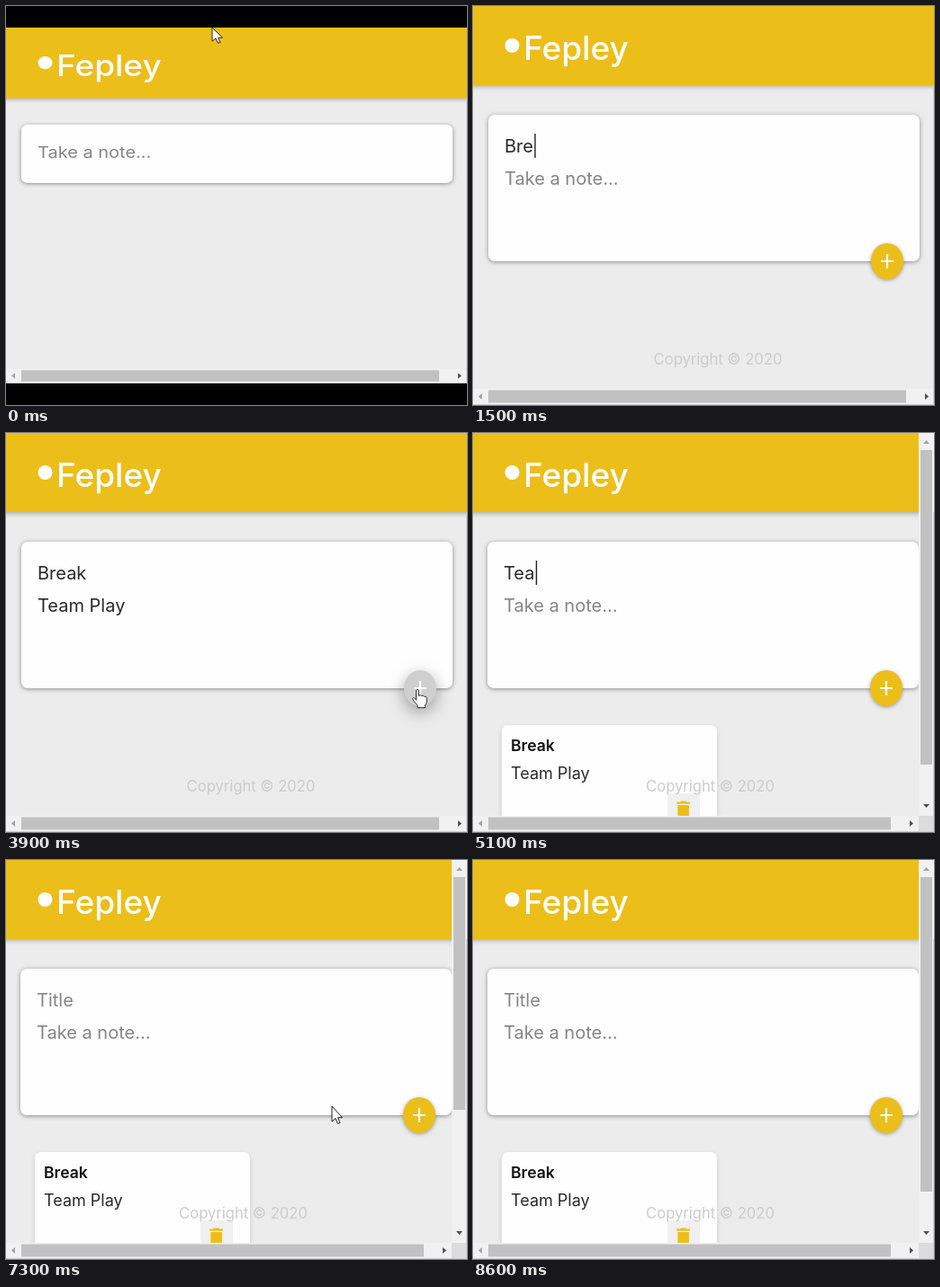
Write an HTML page that moves like this. It is 512 by 444 pixels and loops after 8.7 s.

```html
<!DOCTYPE html>
<html lang="en">
<head>
<meta charset="utf-8">
<title>Notes</title>
<style>
  html, body { margin: 0; width: 100%; height: 100%; overflow: hidden; background: #000; }
  svg { display: block; width: 512px; height: 444px; font-family: Inter, "Open Sans", sans-serif; }
  .bar { fill: #ecbe19; filter: drop-shadow(0 2px 2.5px rgba(0,0,0,.26)); }
  .card { fill: #fefefe; filter: drop-shadow(0 1px 2.5px #8a8989); }
  .paper { fill: #fefefe; filter: drop-shadow(0 2px 2.5px rgba(0,0,0,.14)); }
  .brand { fill: #fff; font-size: 37px; font-weight: 500; }
  .field { font-size: 20px; }
  .note { font-size: 18px; fill: #2a2a2a; }
  .head { font-size: 17.6px; font-weight: 600; fill: #111; }
  .foot { font-size: 16.6px; fill: #ccc; text-anchor: middle; }
  .field, .note { white-space: pre; }
</style>
</head>
<body>
<svg viewBox="0 0 512 444">
  <defs>
    <g id="note">
      <rect class="paper" x="32" y="325" width="239" height="126" rx="7"/>
      <rect x="216" y="401" width="36" height="40" fill="#f0f0f0"/>
      <path transform="translate(221 406) scale(1.05 1.13)" fill="#ecbe19"
        d="M6 19c0 1.1.9 2 2 2h8c1.1 0 2-.9 2-2V7H6zM19 4h-3.5l-1-1h-5l-1 1H5v2h14z"/>
    </g>
    <clipPath id="frame"><rect width="512" height="444"/></clipPath>
  </defs>
  <g id="app" clip-path="url(#frame)">
    <rect width="512" height="444" fill="#ececec"/>
    <g id="page">
      <rect class="bar" x="-10" y="-10" width="532" height="98"/>
      <circle cx="43.5" cy="44" r="8" fill="#fff"/>
      <text class="brand" x="56" y="60">Fepley</text>
      <g id="form">
        <rect id="card" class="card" x="17" y="121" width="479" rx="7"/>
        <text id="title" class="field" x="35" y="163"></text>
        <text id="body" class="field" x="35"></text>
        <path id="caret" stroke="#222" stroke-width="1.4"/>
        <g id="plus">
          <ellipse id="disc" rx="18" ry="20"/>
          <path d="M-7 0H7M0-8V8" stroke="#fff" stroke-width="2.2"/>
        </g>
      </g>
      <g id="first">
        <use href="#note"/>
        <text class="note head" x="42" y="354">Break</text>
        <text class="note" x="42" y="385">Team Play</text>
      </g>
      <g id="second" transform="translate(0 163)">
        <use href="#note"/>
        <text class="note head" x="42" y="354">Tea</text>
        <text class="note" x="42" y="385">Green tea</text>
      </g>
      <text id="foot" class="foot" y="399">Copyright © 2020</text>
    </g>
    <g id="across">
      <rect y="426" width="512" height="18" fill="#f1f1f1"/>
      <rect id="thumbX" x="17" y="427.5" height="14" fill="#c1c1c1"/>
      <path d="M10 431v7l-4-3.5z" fill="#a3a3a3"/>
      <path id="right" d="M-2 431v7l4-3.5z" fill="#505050"/>
    </g>
    <g id="down">
      <rect x="495" width="17" height="427" fill="#f1f1f1"/>
      <rect x="495" y="426" width="17" height="18" fill="#dcdcdc"/>
      <rect id="thumbY" x="497" width="13" fill="#c1c1c1"/>
      <path id="up" d="M500 12h7l-3.5-4z"/>
      <path id="low" d="M500 413h7l-3.5 4z"/>
    </g>
    <path d="M0 443.5H511.5V88" fill="none" stroke="#d0d0d0"/>
    <g id="pointer" fill="#fff" stroke="#222" stroke-width="1" stroke-linejoin="round">
      <path id="arrow" d="M0 0V17L4 13.5L6.5 19.5L9 18.4L6.6 12.6H11.5Z"/>
      <path id="hand" transform="translate(-1 -1) scale(.94)"
        d="M-1.5 1.5Q0-1 1.5 1.5V8Q3.5 6 5 8Q7 7 8 9Q11 8 11 11.5V15Q11 17 9 19V22H0V19Q-4 15-6 11.5Q-5 9-3 11L-1.5 13Z"/>
      <path id="beam" fill="none" d="M-3-8Q0-8 0-6Q0-8 3-8M0-6V6M-3 8Q0 8 0 6Q0 8 3 8"/>
    </g>
  </g>
</svg>
<script>
const LOOP = 8700, TICK = 100;
const $ = id => document.getElementById(id);
const set = (id, attrs) => { for (const k in attrs) $(id).setAttribute(k, attrs[k]); };
const show = (id, on) => set(id, { visibility: on ? 'visible' : 'hidden' });
const move = (id, x, y, extra = '') => set(id, { transform: `translate(${x} ${y}) ${extra}` });
const lastBefore = (keys, t) => keys.filter(k => k[0] <= t).pop();
const ramp = (t, a, b) => Math.min(1, Math.max(0, (t - a) / (b - a)));

const titles = [[0, ''], [1400, 'B'], [1500, 'Bre'], [1700, 'Brea'], [1800, 'Break'],
  [4200, ''], [5000, 'T'], [5100, 'Tea'], [7100, '']];
const bodies = [[0, ''], [2300, 'T'], [2400, 'Te'], [2600, 'Team'], [2800, 'Team '], [2900, 'Team P'],
  [3100, 'Team Pl'], [3200, 'Team Pla'], [3300, 'Team Play'], [4200, ''], [5600, 'G'], [5800, 'Gr'],
  [6000, 'Gre'], [6200, 'Green'], [6300, 'Green t'], [6400, 'Green te'], [6500, 'Green tea'], [7100, '']];
const carets = [[0, ''], [1200, 'title'], [2000, ''], [2100, 'body'], [3500, ''],
  [4800, 'title'], [5300, ''], [5400, 'body'], [6700, '']];
const pointers = [
  [0, 229, 0, 'arrow'], [300, 222, 70, 'arrow'], [500, 180, 150, 'beam'], [900, 160, 160, 'beam'],
  [1200, 100, 157, 'beam'], [1300, 0, 0, ''],
  [3500, 140, 215, 'beam'], [3700, 400, 262, 'beam'], [3800, 458, 286, 'hand'], [4300, 458, 286, 'hand'],
  [4400, 300, 220, 'beam'], [4600, 95, 158, 'beam'], [4700, 0, 0, ''],
  [6700, 130, 215, 'beam'], [6900, 458, 286, 'hand'], [7100, 458, 286, 'hand'], [7200, 420, 282, 'arrow'],
  [7300, 362, 274, 'arrow'], [7500, 262, 310, 'arrow'], [7700, 239, 376, 'hand'], [8200, 239, 376, 'hand'],
  [8300, 260, 250, 'arrow'], [8500, 300, 20, 'arrow'], [8600, 0, 0, '']];

function pointerAt(t) {
  const from = lastBefore(pointers, t);
  const to = pointers[pointers.indexOf(from) + 1];
  const f = to && to[3] ? ramp(t, from[0], to[0]) : 0;
  const mix = i => from[i] + (f ? (to[i] - from[i]) * f : 0);
  return { x: mix(1), y: mix(2), kind: from[3] };
}

function writeField(id, text, hint) {
  $(id).textContent = text || hint;
  set(id, { fill: text ? '#2a2a2a' : '#858585' });
}

function drawScrollbars(tall, two, scroll) {
  const range = two ? 208 : 47, length = two ? 259 : 350;
  set('thumbX', { width: tall ? 447 : 464 });
  move('right', tall ? 487 : 504, 0);
  show('down', tall);
  set('thumbY', { y: 19 + scroll / range * (387 - length), height: length });
  set('up', { fill: scroll > 0 ? '#505050' : '#a3a3a3' });
  set('low', { fill: scroll < range ? '#505050' : '#a3a3a3' });
}

function draw(t) {
  const open = t >= 1000, tall = t >= 4200, two = t >= 7100 && t < 8100;
  const scroll = t < 8100 ? 208 * ramp(t, 7300, 7500) : 47 * (1 - ramp(t, 8200, 8400));
  const title = lastBefore(titles, t)[1], body = lastBefore(bodies, t)[1];
  const focus = lastBefore(carets, t)[1];
  const { x, y, kind } = pointerAt(t);
  const hover = kind === 'hand' && x > 400;

  // The opening is letterboxed.
  set('app', { transform: open ? '' : 'translate(0 24) scale(1 .892)' });
  move('page', 0, -scroll);
  move('form', tall ? -1 : 0, 0);
  set('card', { height: open ? 163 : 73 });
  show('title', open);
  writeField('title', title, 'Title');
  writeField('body', body, 'Take a note...');
  set('body', { y: open ? 199 : 163 });

  show('caret', focus);
  if (focus) {
    const typed = focus === 'title' ? title : body;
    const end = typed ? 37 + $(focus).getComputedTextLength() : 36;
    set('caret', { d: `M${end} ${focus === 'title' ? 142 : 178}v27` });
  }

  show('plus', open);
  move('plus', 460, 284, `scale(${0.3 + 0.7 * ramp(t, 1000, 1200)})`);
  $('disc').style.fill = hover ? '#cfcfcf' : '#ecbe19';
  $('disc').style.filter = `drop-shadow(0 ${hover ? '6px 9px' : '1px 2px'} rgba(0,0,0,.35))`;

  show('first', tall);
  show('second', two);
  set('foot', { x: tall ? 263.5 : 272, opacity: ramp(t, 0, 400) });
  drawScrollbars(tall, two, scroll);

  move('pointer', x, y);
  for (const shape of ['arrow', 'hand', 'beam']) show(shape, shape === kind);
}

const start = performance.now();
function frame() {
  const t = (performance.now() - start) % LOOP;
  draw(Math.floor(t / TICK) * TICK);
  requestAnimationFrame(frame);
}
frame();
</script>
</body>
</html>
```
